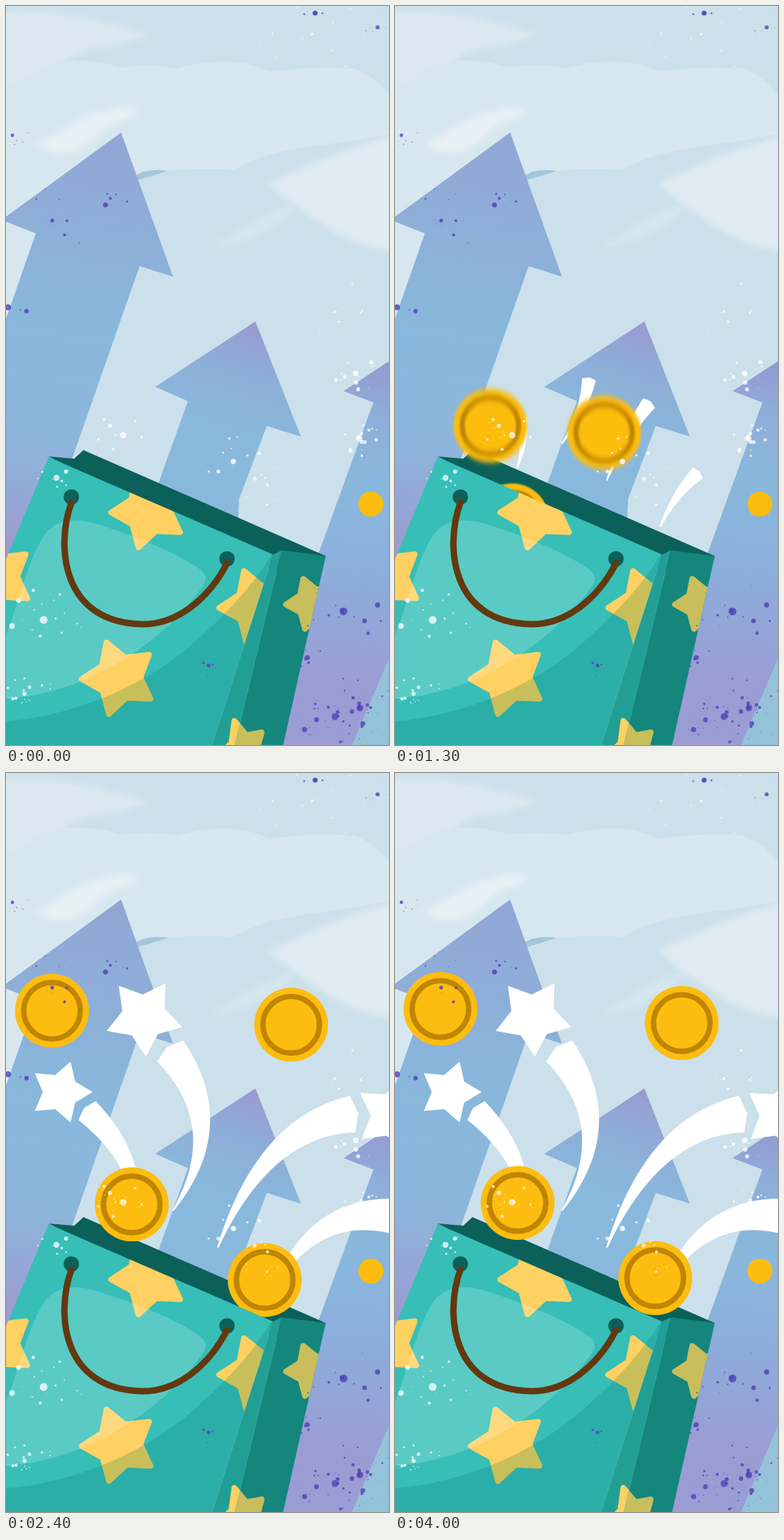
Write an HTML page that moves like this. It is 539 px wide and 1040 px high and loops after 4100 ms.

```html
<!DOCTYPE html>
<html lang="en">
<head>
<meta charset="utf-8">
<title>Shopping bag</title>
<style>
  html, body { margin: 0; width: 100%; height: 100%; overflow: hidden; background: #cbe0ea; }
  svg { display: block; width: 100vw; height: 100vh; }
  .round { stroke-width: 8; stroke-linejoin: round; }
  .gold { fill: #ffd062; stroke: #ffd062; }
  .olive { fill: #c8be5c; stroke: #c8be5c; }
  .shade { fill: #c8eae9; mix-blend-mode: multiply; }
  .bag { isolation: isolate; }
  .haze { filter: url(#soft); opacity: .85; }
</style>
</head>
<body>
<svg viewBox="0 0 539 1040" preserveAspectRatio="none">
  <defs id="defs">
    <linearGradient id="up1" gradientUnits="userSpaceOnUse" x1="120" y1="180" x2="30" y2="790">
      <stop offset="0" stop-color="#93a6d6"/><stop offset=".46" stop-color="#88b8dc"/>
      <stop offset=".72" stop-color="#8db5dc"/><stop offset="1" stop-color="#9d97d0"/>
    </linearGradient>
    <linearGradient id="up2" gradientUnits="userSpaceOnUse" x1="360" y1="444" x2="310" y2="600">
      <stop offset="0" stop-color="#9a98d1"/><stop offset=".45" stop-color="#8eadd8"/><stop offset="1" stop-color="#88b9dd"/>
    </linearGradient>
    <linearGradient id="up3" gradientUnits="userSpaceOnUse" x1="520" y1="500" x2="490" y2="1000">
      <stop offset="0" stop-color="#9498d0"/><stop offset=".14" stop-color="#8fadd9"/><stop offset=".35" stop-color="#88b8dc"/>
      <stop offset=".6" stop-color="#8caedb"/><stop offset=".9" stop-color="#9a9dd3"/>
    </linearGradient>
    <filter id="soft"><feGaussianBlur stdDeviation="4"/></filter>
    <clipPath id="front"><path d="M60 635L376 772L290 1040H-9V800Z"/></clipPath>
    <clipPath id="side"><path d="M388 766L450 774L390 1040H322Z"/></clipPath>
    <g id="coin">
      <circle r="52" fill="#fdbd10"/>
      <circle r="39.8" fill="none" stroke="#c08502" stroke-width="7.6"/>
    </g>
  </defs>

  <!-- sky -->
  <path fill="#cbe0ea" d="M0 0H539V1040H0Z"/>
  <path class="haze" fill="#dfeaf1" d="M-20 10C60 0 130 20 200 40C150 65 120 50 85 77C60 100 30 115 -20 125Z"/>
  <path fill="#d7e7ef" d="M0 115C30 100 50 80 85 77Q130 75 160 87Q200 80 240 88Q315 66 370 92Q440 84 490 88Q515 96 539 124V180C450 200 380 195 320 231Q270 226 225 233L182 241L0 440Z"/>
  <path class="haze" fill="#e3edf3" d="M370 250C420 225 480 200 550 180V346C500 340 470 325 440 303C420 290 400 278 370 250Z"/>
  <path class="haze" fill="#d8e7ef" d="M285 342C330 315 370 285 410 280C395 305 345 335 285 342Z"/>
  <path class="haze" fill="#eaf2f6" d="M40 196C75 180 95 158 130 150Q175 136 186 147C180 160 150 162 135 175C115 200 85 212 65 206Z"/>
  <path fill="#a3c7da" d="M180 241Q195 227 228 232Q205 240 180 246Z"/>

  <!-- arrows -->
  <path fill="url(#up1)" d="M162 178L235 381L188 366L85 660L0 900V440L42 320L-6 301Z"/>
  <path fill="url(#up2)" d="M351 444L415 606L367 591L328 694L326 740H190L256 556L210 536Z"/>
  <path fill="#94c2d9" d="M539 900V1040H470Z"/>
  <path fill="url(#up3)" d="M545 496L475 542L517 558L440 770L360 1040H487L539 918Z"/>
  <circle cx="513.5" cy="701" r="17.6" fill="#fdbd10"/>

  <path fill="#0c605a" d="M60 634L96 637L109 625L450 774L388 800Z"/>
  <g id="burst" fill="#fff"></g>
  <g id="coins"></g>

  <!-- bag -->
  <g class="bag">
    <g clip-path="url(#front)">
      <path fill="#36beb7" d="M-9 600H400V1040H-9Z"/>
      <g id="frontStars" class="gold round"></g>
      <path fill="#fff" opacity=".18" d="M-9 905C15 860 26 785 55 743C75 717 108 721 140 733C190 749 240 770 272 792C284 801 283 809 276 818C220 897 110 972 -9 975Z"/>
      <path class="shade" d="M-9 1007C95 1002 200 953 262 898C312 855 350 812 378 766V1050H-9Z"/>
    </g>
    <path fill="#229f95" d="M376 772L388 766L322 1040H290Z"/>
    <g id="foldStar" class="gold round"></g>
    <g clip-path="url(#side)">
      <path fill="#14867c" d="M300 750H460V1040H300Z"/>
      <g id="sideStars" class="olive round"></g>
    </g>
    <g fill="#0d5f59"><circle cx="92" cy="691" r="10.8"/><circle cx="311" cy="778" r="10.8"/></g>
    <path fill="none" stroke="#63390f" stroke-width="9" stroke-linecap="round" d="M92 699C70 760 78 868 192 870C250 870 292 822 311 784"/>
  </g>
  <g id="specks"></g>
</svg>
<script>
const LOOP = 4100, STEP = 100, LAND = 2000, SWAY = 1280;
const $ = id => document.getElementById(id);
const add = (parent, tag, attrs = {}) => {
  const el = document.createElementNS('http://www.w3.org/2000/svg', tag);
  for (const k in attrs) el.setAttribute(k, attrs[k]);
  return parent.appendChild(el);
};
const clamp = x => Math.max(0, Math.min(1, x));
const ease = x => (1 - Math.cos(Math.PI * clamp(x))) / 2;
const mix = (a, b, k) => a.map((v, i) => v + (b[i] - v) * k);
const polygon = pts => 'M' + pts.map(p => p.map(v => v.toFixed(1)).join(' ')).join('L') + 'Z';

// five-pointed star; turn is the angle of one tip, squash narrows it
function star(x, y, r, turn, inner = .56, squash = 1) {
  return polygon(Array.from({ length: 10 }, (_, i) => {
    const a = (turn + 36 * i) * Math.PI / 180, d = i % 2 ? r * inner : r;
    return [x + d * Math.cos(a) * squash, y + d * Math.sin(a)];
  }));
}

// tapered ribbon along a quadratic curve, drawn up to the share s
function ribbon([a, b, c], width, s) {
  const left = [], right = [];
  let tip;
  for (let i = 0; i <= 24; i++) {
    const k = s * i / 24;
    const p = mix(a, b, k), q = mix(b, c, k), [x, y] = mix(p, q, k);
    const dx = q[0] - p[0], dy = q[1] - p[1], len = Math.hypot(dx, dy);
    const ux = dx / len, uy = dy / len, h = 1 + (width / 2 - 1) * k;
    left.push([x + uy * h, y - ux * h]);
    right.unshift([x - uy * h, y + ux * h]);
    tip = [x + ux * h * .3, y + uy * h * .3];
  }
  return polygon([...left, tip, ...right]);
}

// pattern on the bag: the same star repeated
const PRINT_TURN = 34;
for (const [x, y] of [[201, 711], [-14, 804], [159.5, 945.5], [353, 845]])
  add($('frontStars'), 'path', { d: star(x, y, 53, PRINT_TURN) });
add($('sideStars'), 'path', { d: star(431, 841, 37, PRINT_TURN) });
for (const id of ['foldStar', 'sideStars'])
  add($(id), 'path', { d: star(333, 1053, 50, PRINT_TURN, .56, .68) });

// white trails: tail, bend, head and width at the head
const trails = [
  { line: [[172, 650], [204, 558], [114, 475]], width: 36 },
  { line: [[235, 616], [316, 497], [231, 391]], width: 47 },
  { line: [[298, 668], [363, 498], [488, 480]], width: 52 },
  { line: [[373, 733], [430, 608], [548, 624]], width: 50 }
];
const stars = [[77, 449, 45, -72], [194, 343, 56, -57], [544, 481, 55, -74]];
for (const t of trails) t.el = add($('burst'), 'path');
const starEls = stars.map(() => add($('burst'), 'path'));

// launch time, launch point, low and high end of the sway
const coins = [
  { t0: 760, from: [179, 757], low: [66.8, 340.8], high: [63.8, 331.7] },
  { t0: 760, from: [227, 760], low: [395.4, 360.6], high: [403.9, 351.5] },
  { t0: 1000, from: [159, 753], low: [188.4, 612.2], high: [171.9, 604.8] },
  { t0: 1000, from: [275, 819], low: [358.4, 720], high: [366.6, 710.5] }
];
coins.forEach((c, i) => {
  const f = add($('defs'), 'filter', { id: 'blur' + i, x: '-20%', y: '-20%', width: '140%', height: '140%' });
  c.blur = add(f, 'feGaussianBlur');
  c.filter = `url(#blur${i})`;
  c.el = add($('coins'), 'g');
  add(c.el, 'use', { href: '#coin' });
});

// paint spatter: one big drop, small ones scattered around it
let seed = 7;
const rand = () => (seed = (seed * 16807) % 2147483647) / 2147483647;
function spatter(fill, opacity, areas) {
  for (const [x, y, spread, n, r] of areas)
    for (let i = 0; i < n; i++) {
      const a = 2 * Math.PI * rand(), d = i ? spread * rand() : 0;
      add($('specks'), 'circle', {
        cx: x + d * Math.cos(a), cy: y + d * Math.sin(a) * .8,
        r: i ? .4 + .7 * r * rand() ** 4 : r, fill, opacity
      });
    }
}
spatter('#fff', .75, [
  [430, 40, 80, 50, 1.5], [463, 430, 60, 25, 2], [492, 517, 35, 20, 4], [497, 608, 35, 28, 4.5],
  [320, 641, 45, 24, 3.8], [368, 674, 40, 12, 2.2], [165, 604, 45, 20, 4.5], [71, 664, 30, 12, 4.2],
  [53, 864, 55, 32, 5.5], [26, 968, 40, 30, 3]
]);
spatter('#5340b8', .8, [
  [435, 10, 35, 8, 3.6], [523, 30, 30, 8, 2.8], [9, 182, 26, 9, 2.4], [65, 302, 60, 18, 2.7],
  [140, 280, 35, 12, 3.5], [3, 424, 40, 8, 4.2], [475, 852, 60, 25, 5.5], [424, 917, 25, 8, 3.6],
  [498, 988, 60, 40, 4.6], [463, 1000, 60, 45, 4.8], [285, 928, 28, 10, 2.6]
]);

function place(c, t) {
  return t < LAND
    ? mix(c.from, c.low, ease((t - c.t0) / (LAND - c.t0)))
    : mix(c.low, c.high, (1 - Math.cos(2 * Math.PI * (t - LAND) / SWAY)) / 2);
}

function drawCoin(c, t) {
  const now = place(c, t), before = place(c, t - 20);
  const [bx, by] = now.map((v, i) => Math.abs(v - before[i]) * .38);
  c.el.setAttribute('visibility', t > c.t0 ? 'visible' : 'hidden');
  c.el.setAttribute('transform', `translate(${now})`);
  c.blur.setAttribute('stdDeviation', `${bx} ${by}`);
  c.el.setAttribute('filter', by > .5 ? c.filter : 'none');
}

function draw(t) {
  coins.forEach(c => drawCoin(c, t));
  const grow = ease((t - 1000) / 700), pop = ease((t - 1600) / 400);
  for (const { el, line, width } of trails) el.setAttribute('d', grow ? ribbon(line, width, grow) : '');
  stars.forEach(([x, y, r, turn], i) => starEls[i].setAttribute('d', pop ? star(x, y, r * pop, turn) : ''));
}

const start = performance.now();
function tick() {
  const t = (performance.now() - start) % LOOP;
  draw(Math.floor(t / STEP) * STEP);
  requestAnimationFrame(tick);
}
tick();
</script>
</body>
</html>
```
